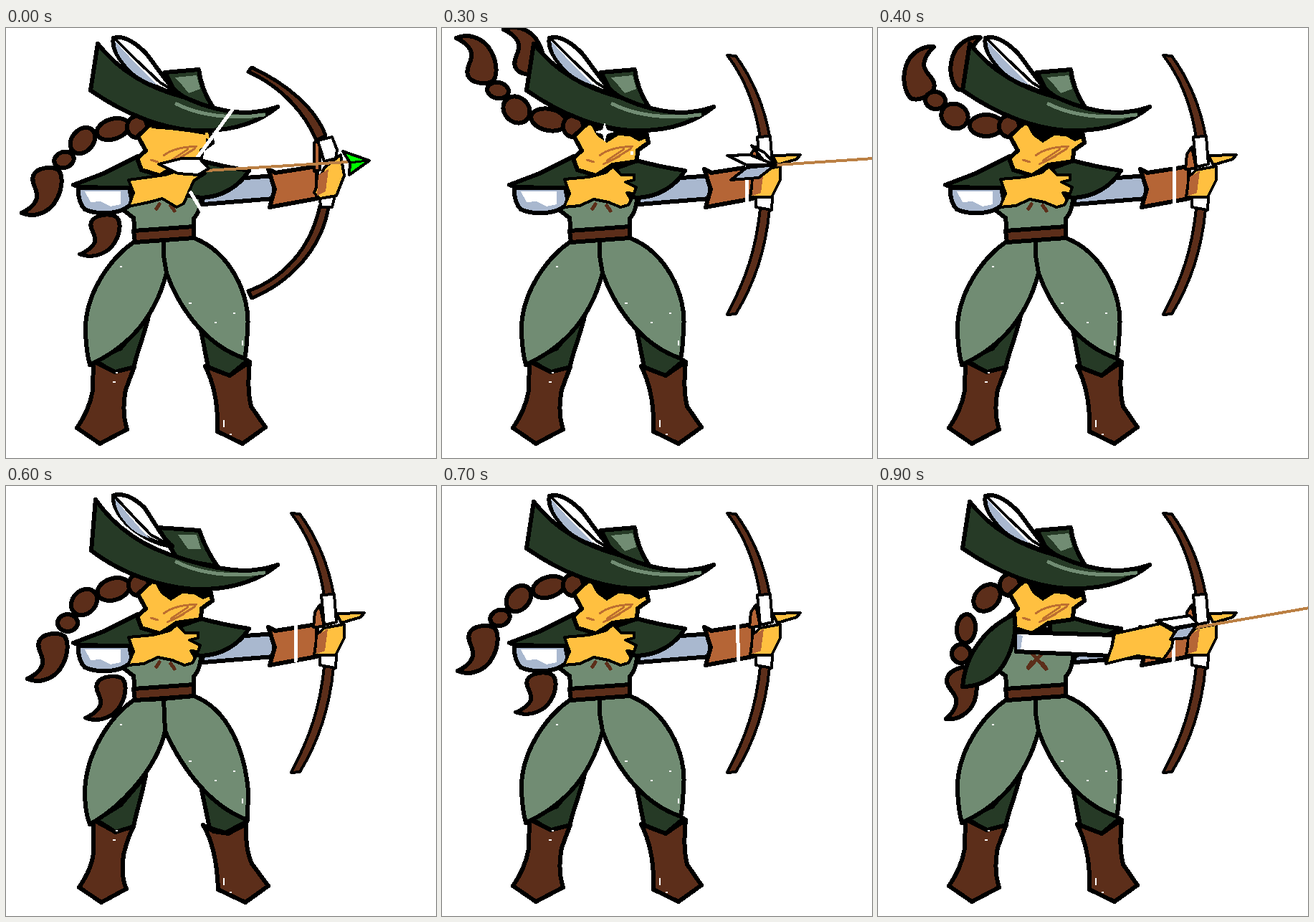
These frames come from a looping animation (600 px wide and 600 px high, 1 s). An HTML page:

```html
<!DOCTYPE html>
<html lang="en">
<head>
<meta charset="utf-8">
<title>Archer</title>
<style>
  html, body { margin: 0; width: 100%; height: 100%; overflow: hidden; background: #fff; }
  svg { display: block; width: 100vw; height: 100vh; }
  g.pose { display: none; }
  g.pose.on { display: block; }
</style>
</head>
<body>
<svg id="stage" viewBox="0 0 600 600" shape-rendering="crispEdges" stroke-linejoin="round" stroke-linecap="round"></svg>
<script>
const DARK = '#263a26', SAGE = '#718c73', BROWN = '#5c2e1a', LEATHER = '#b56536',
      GOLD = '#ffc040', BLUE = '#a9b8cf', MARK = '#bd6f30', SHAFT = '#bb8044';

const shape = (d, fill, width = 6) =>
  `<path d="${d}" fill="${fill}" stroke="#000" stroke-width="${width}"/>`;
const flat = (d, fill) => `<path d="${d}" fill="${fill}"/>`;
const line = (d, color, width) =>
  `<path d="${d}" fill="none" stroke="${color}" stroke-width="${width}"/>`;

// Braid: beads are [x, y, rx, ry, angle], tails are [x, y, transform].
const bead = ([x, y, rx, ry, a = 0]) =>
  `<ellipse cx="${x}" cy="${y}" rx="${rx}" ry="${ry}" transform="rotate(${a} ${x} ${y})" fill="${BROWN}" stroke="#000" stroke-width="6"/>`;
const tail = ([x, y, turn = '']) =>
  `<g transform="translate(${x} ${y}) ${turn}">` +
  shape('M-21 4C-16-8 6-10 15-3C21 6 20 26 8 43C-2 57-22 63-37 56C-22 49-14 38-16 30C-17 20-24 14-21 4Z', BROWN) + '</g>';
const braid = ({ beads, tails }) =>
  tails.map(tail).join('') + [...beads].reverse().map(bead).join('');

const braids = {
  hanging: {
    beads: [[183, 138, 14, 15], [149, 141, 23, 14, -18], [107, 157, 20, 15, -50], [81, 184, 14, 11, -20]],
    tails: [[59, 202], [140, 267, 'scale(1 .87)']]
  },
  raised: {
    beads: [[183, 137, 14, 15], [149, 128, 25, 15, 12], [104, 114, 20, 17, 45], [78, 87, 15, 11, 10]],
    tails: [[57, 70, 'scale(1 -1)'], [123, 58, 'scale(1 -1)']]
  },
  falling: {
    beads: [[183, 137, 14, 15], [151, 136, 23, 15], [107, 123, 19, 17, 25], [80, 101, 14, 12, 10]],
    tails: [[60, 91, 'rotate(162)'], [125, 78, 'rotate(162)']]
  },
  dropping: {
    beads: [[183, 138, 14, 15], [152, 141, 21, 15, -10], [111, 131, 18, 18], [82, 114, 13, 14, 10], [148, 112, 18, 12]],
    tails: [[65, 103, 'rotate(145)'], [129, 85, 'rotate(145)']]
  },
  settling: {
    beads: [[185, 138, 14, 15], [150, 144, 23, 15, -18], [109, 162, 20, 16, -45], [86, 191, 14, 12]],
    tails: [[67, 213], [148, 272, 'scale(1 .92)']]
  },
  swept: {
    beads: [[184, 138, 14, 15], [152, 156, 21, 16, -45], [123, 199, 13, 20, 5], [116, 234, 13, 13]],
    tails: [[115, 261, 'rotate(-16)']]
  }
};

// Two slightly different drawings of legs and hat make the line boil.
const drawings = [{
  shins: ['M200 398C193 430 183 450 178 475L152 481L124 464L160 447Z', 'M270 412L282 473L312 485L337 464Z'],
  boots: ['M122 465L152 480L179 473Q173 488 167 505Q161 535 169 560L131 580L99 558Q117 532 121 505Z',
          'M278 472L312 485L340 466Q336 505 342 528L362 557L330 580L295 563Q297 510 278 472Z'],
  thighs: ['M220 296L178 299C145 322 109 372 111 425Q112 452 117 470C160 450 205 415 224 342L220 318Z',
           'M220 296L262 293C312 312 342 372 337 420Q336 448 333 461C285 445 245 400 224 342L220 318Z'],
  brim: 'M128 22C160 62 200 84 250 97Q290 116 330 118Q357 118 379 110C355 130 320 143 278 143C225 145 165 120 118 87Z',
  crown: 'M222 62L269 58Q273 88 290 112L240 97Z',
  shine: 'M236 69L266 66L271 85L255 91L246 80Z',
  feather: 'M150 14Q168 8 195 35C215 60 228 84 248 96C220 88 190 75 168 55Q146 30 150 14Z',
  vane: 'M152 18Q178 48 212 80Q182 70 168 52Q153 36 152 18Z',
  rib: 'M152 15L180 43L215 76L245 95'
}, {
  shins: ['M195 404C190 430 182 455 178 475L153 483L126 466L160 445Z', 'M270 410L284 477L306 484L336 468Z'],
  boots: ['M122 466L153 483L178 475Q169 493 164 515Q160 545 168 562L133 581L102 560Q121 532 122 510Z',
          'M275 473L290 482L310 485L335 472Q334 508 343 527L366 558L334 581L296 563Q294 505 275 473Z'],
  thighs: ['M220 297L178 299C145 322 112 372 110 425Q110 455 117 472C160 448 210 395 222 342Z',
           'M220 297L262 293C312 312 333 372 338 425L337 466C285 447 246 395 222 342Z'],
  brim: 'M125 19C152 58 192 86 245 101Q290 116 330 118Q357 118 379 110C355 130 320 143 278 144C225 146 160 122 119 90Z',
  crown: 'M212 58L270 62Q278 88 295 112L240 103Z',
  shine: 'M240 68L266 68L272 88L254 88Z',
  feather: 'M150 13Q170 8 193 30C208 52 218 72 232 84C212 82 188 70 170 54Q148 32 150 13Z',
  vane: 'M152 17Q174 46 200 73Q178 66 167 51Q153 36 152 17Z',
  rib: 'M152 15L178 43L202 68L226 81'
}];

const torso = shape('M188 200L272 200V238Q271 256 262 266V280L180 285L178 265L165 255Z', SAGE) +
  line('M210 252L214 246M230 248L235 255', BROWN, 5) +
  shape('M178 283L262 277V293L180 299Z', BROWN);

const legs = d =>
  d.shins.map(s => shape(s, DARK)).join('') +
  d.boots.map(s => shape(s, BROWN)).join('') +
  d.thighs.map(s => shape(s, SAGE)).join('') +
  line('M160 333h1M256 384h2M292 411h1M318 398h1M154 481h1M150 494h2M304 548v8M313 567h1M330 437v5', '#fff', 1.6);

const hat = d =>
  shape(d.crown, DARK) + flat(d.shine, SAGE) + shape(d.brim, DARK) +
  line('M238 106C270 122 315 128 360 121', SAGE, 5) +
  shape(d.feather, '#fff') + flat(d.vane, BLUE) + line(d.rib, '#000', 4);

const face = squint =>
  shape('M203 133L184 151L195 171L183 182L189 198L215 206L238 191L272 186L273 171L288 160L284 140Z', GOLD) +
  flat(squint ? 'M203 130H278V149Q240 142 203 140ZM279 154L289 157L286 165L279 164Z'
              : 'M206 132L216 150L230 160L246 150L262 151L275 158L288 153L284 134Z', '#000') +
  line('M202 184L212 187M225 190L248 179M220 178C232 168 250 166 266 165M230 185L254 169M238 184L264 168', MARK, 3);

const sparkle = flat('M227 131L230 142L241 145L230 148L227 160L224 148L213 145L224 142Z', '#fff') +
  flat('M263 172h4v5h-4z', '#fff');

const cape = shape('M94 219L136 203L184 179L192 198L215 206L272 185Q305 194 339 199C325 222 300 236 272 237L200 224L104 222Z', DARK);

const backArm = shape('M272 240L320 210L376 206L373 238L276 246Z', BLUE) +
  shape('M366 197L376 202L434 193V238L368 250L375 225Z', LEATHER);

const bowDrawn =
  shape('M343 55C392 78 432 112 446 150L433 157C418 120 385 82 338 61Z', BROWN, 5) +
  shape('M438 248L450 250C440 310 395 355 343 377L338 367C385 350 425 310 438 248Z', BROWN, 5) +
  shape('M430 160L438 158V198L430 200Z', LEATHER, 4) +
  shape('M435 157L455 152L462 170L460 182L444 186Z', '#fff', 4) +
  shape('M437 238L459 234L455 250L440 250Z', '#fff', 4) +
  shape('M444 195L467 177L472 206L461 234L438 238L430 230Z', GOLD, 4) +
  flat('M436 205L450 197L446 228L434 234Z', LEATHER);

const bowRelaxed = (stringX, tilt = 0) =>
  line(`M${stringX} 192L${stringX + tilt} 244`, '#fff', 5) +
  shape('M398 38L410 39C434 72 450 112 457 150L444 154C438 112 424 72 398 38Z', BROWN, 4) +
  shape('M444 252L457 252C452 310 434 360 410 399L398 400C424 350 438 310 444 252Z', BROWN, 4) +
  shape('M429 197L431 176L438 166L444 196Z', LEATHER, 4) +
  shape('M461 178L500 177L495 183L468 191Z', GOLD, 4) +
  shape('M440 152L458 151L461 190L444 194Z', '#fff', 4) +
  shape('M438 235L461 236L460 254L438 250Z', '#fff', 4) +
  shape('M444 198L472 193L472 212L460 236L430 236L434 208Z', GOLD, 4) +
  flat('M435 208L449 199L445 230L433 234Z', LEATHER);

const sleeve = shape('M101 223H172L176 243C165 260 130 262 110 253Q100 243 101 223Z', BLUE) +
  flat('M110 228H160V246L146 249L132 242L118 243Z', '#fff');

const handOpen = shape('M171 211L205 208L228 202L239 193L250 205L268 205V212L256 215L271 222L268 231L258 230L264 240L260 247L249 250L232 243L212 239L192 248L170 250L178 231Z', GOLD, 4);
const handPulling = shape('M171 212L222 205L240 199L278 203L262 213L248 245L238 250L218 238L200 243L171 249L178 230Z', GOLD, 4);

const arrowDrawn =
  line('M316 114L266 182M258 230L273 255', '#fff', 5) +
  line('M280 199L476 187', SHAFT, 4) +
  shape('M213 190L245 182H270L283 196L268 205L240 203Z', '#fff', 4) +
  shape('M470 172L507 185L479 205L480 188Z', '#0f0', 4) +
  line('M479 188L505 185', '#000', 3);

const arrowLeaving =
  line('M468 191L602 182', SHAFT, 4) +
  shape('M403 212L425 195L465 191L442 209Z', BLUE, 4) +
  shape('M432 164L450 174L466 191L398 178L426 177L448 184Z', '#fff', 4) +
  shape('M398 178L430 177L465 191L425 191Z', '#fff', 4);

const arrowNocked =
  line('M440 198L602 170', SHAFT, 4) +
  shape('M388 188L435 181L446 192L412 198Z', '#fff', 4) +
  shape('M408 214L418 199L444 194L432 212Z', BLUE, 4);

const reach =
  shape('M192 204L330 208L325 237L193 231Z', '#fff') +
  flat('M194 207L202 209L199 228H194Z', BLUE) +
  shape('M190 179C196 208 183 244 165 262C150 275 135 280 118 280C121 240 145 200 190 179Z', DARK) +
  shape('M330 206L394 192L413 203L410 225L398 242L362 237L318 248L327 222Z', GOLD, 4);

const farCape = shape('M240 188L272 184Q305 195 339 199L315 210H240Z', DARK);
const laces = line('M210 254L227 236M216 235L234 255', BROWN, 5);

const figure = (hair, bow, front, { drawing = 0, squint = false, shoulders = cape, extra = '' } = {}) => {
  const d = drawings[drawing];
  return braid(hair) + backArm + bow + legs(d) + torso + shoulders +
    face(squint) + hat(d) + front + extra;
};

const idleArm = sleeve + handOpen;
const pullArm = sleeve + handPulling + arrowDrawn;
const aim = figure(braids.hanging, bowDrawn, pullArm, { squint: true });
const rest = figure(braids.settling, bowRelaxed(404), idleArm, { drawing: 1 });

const poses = [
  aim,
  aim,
  figure(braids.hanging, bowDrawn, pullArm, { squint: true, extra: sparkle }),
  figure(braids.raised, bowRelaxed(425), idleArm, { extra: arrowLeaving + sparkle }),
  figure(braids.falling, bowRelaxed(413), idleArm),
  figure(braids.dropping, bowRelaxed(412, 2), idleArm),
  rest,
  figure(braids.hanging, bowRelaxed(412, 2), idleArm),
  rest,
  figure(braids.swept, bowRelaxed(412), reach + arrowNocked, { shoulders: farCape + laces })
];

const stage = document.getElementById('stage');
stage.innerHTML = poses.map(p => `<g class="pose">${p}</g>`).join('');

function tick() {
  const step = Math.floor(performance.now() % 1000 / 100);
  [...stage.children].forEach((g, i) => g.classList.toggle('on', i === step));
  requestAnimationFrame(tick);
}
tick();
</script>
</body>
</html>
```
